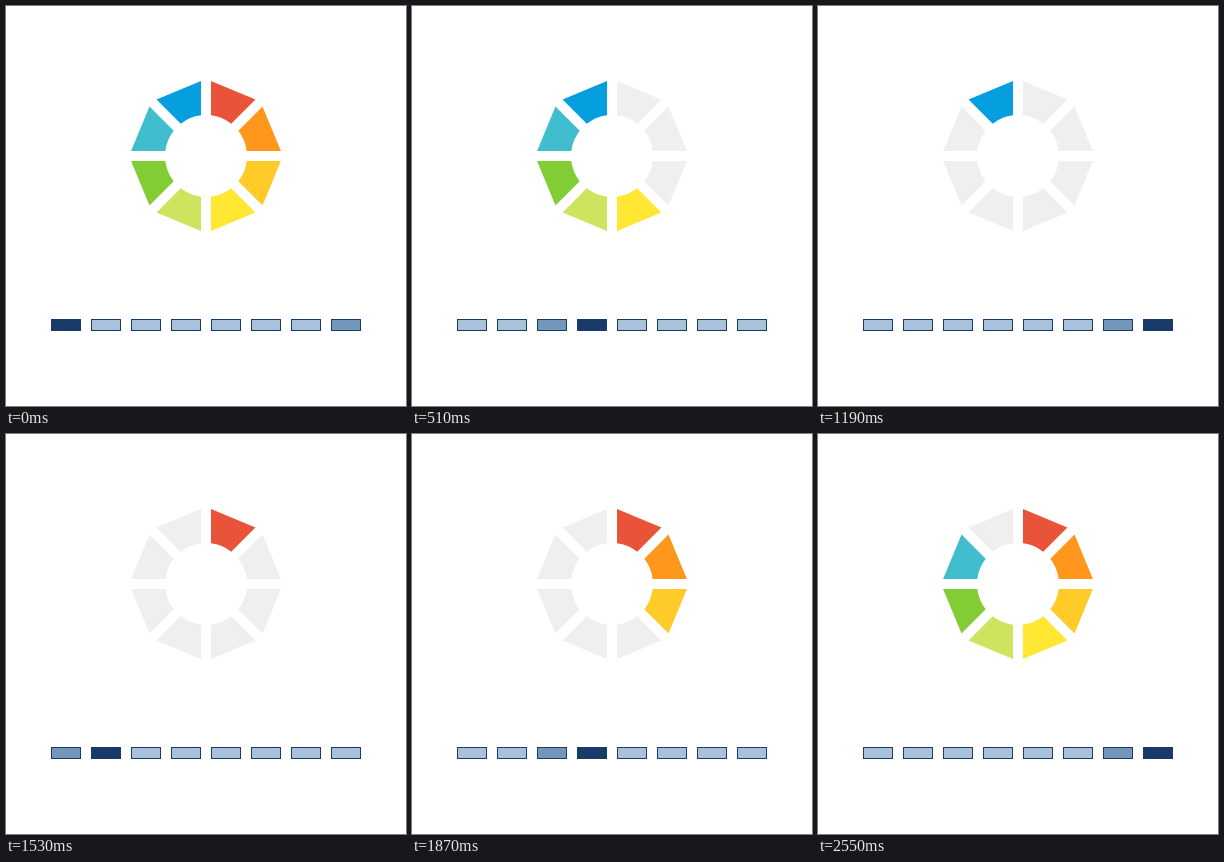
Write an HTML page with a canvas that moves like this. It is 400 px wide and 400 px high and loops after 2720 ms.

```html
<!DOCTYPE html>
<html lang="en">
<head>
<meta charset="utf-8">
<title>Color wheel loader</title>
<style>
  html, body { margin: 0; width: 100%; height: 100%; overflow: hidden; background: #fff; }
  canvas { display: block; width: 400px; height: 400px; }
</style>
</head>
<body>
<canvas id="stage" width="400" height="400"></canvas>
<script>
const ctx = document.getElementById('stage').getContext('2d');

const STEP = 170;
const COUNT = 8;
const COLORS = ['#e95339', '#ff971d', '#ffcb29', '#ffe733',
                '#cee45f', '#82cd34', '#41bece', '#059ede'];
const OFF = '#efefef';
const DARK = '#183b6a', MID = '#7397b9', LIGHT = '#aac1dc';

const OUTER = 77, INNER = 41, HALF_GAP = 5;
const SLICE = Math.PI * 2 / COUNT;
const UP = -Math.PI / 2;

// Point on the slice's second edge, at a distance along it.
function onSecondEdge(along) {
  const s = Math.sin(SLICE), c = Math.cos(SLICE);
  return [along * s - HALF_GAP * c, -along * c - HALF_GAP * s];
}

// First slice of the octagon, clockwise from straight up.
function makeSlice() {
  const reach = OUTER - HALF_GAP * Math.tan(SLICE / 2);
  const inset = Math.asin(HALF_GAP / INNER);
  const path = new Path2D();
  path.moveTo(HALF_GAP, -reach);
  path.lineTo(...onSecondEdge(reach));
  path.arc(0, 0, INNER, UP + SLICE - inset, UP + inset, true);
  path.closePath();
  return path;
}

const slice = makeSlice();

function drawWheel(step) {
  const cut = step % COUNT;
  const filling = step >= COUNT;
  COLORS.forEach((color, i) => {
    ctx.save();
    ctx.translate(200, 150);
    ctx.rotate(i * SLICE);
    ctx.fillStyle = (i < cut) === filling ? color : OFF;
    ctx.fill(slice);
    ctx.restore();
  });
}

function drawBars(step) {
  const head = step % COUNT;
  const tail = (head + COUNT - 1) % COUNT;
  for (let i = 0; i < COUNT; i++) {
    const x = 45 + i * 40;
    ctx.fillStyle = DARK;
    ctx.fillRect(x, 313, 30, 12);
    ctx.fillStyle = i === head ? DARK : i === tail ? MID : LIGHT;
    ctx.fillRect(x + 1, 314, 28, 10);
  }
}

function frame(now) {
  const step = Math.floor(now / STEP) % (COUNT * 2);
  ctx.fillStyle = '#fff';
  ctx.fillRect(0, 0, 400, 400);
  drawWheel(step);
  drawBars(step);
  requestAnimationFrame(frame);
}
requestAnimationFrame(frame);
</script>
</body>
</html>
```
